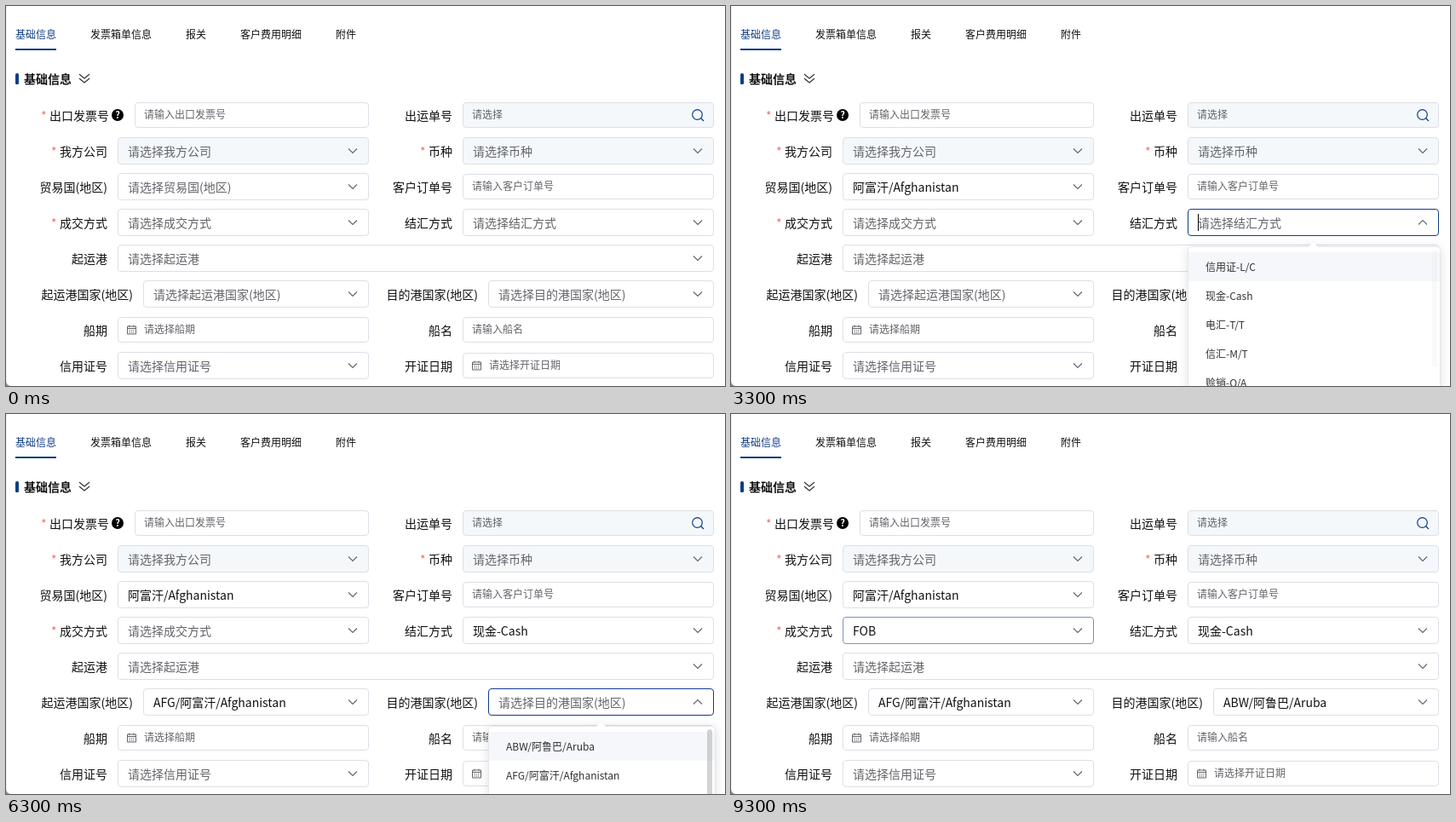
An HTML page that plays this animation: 844 px wide and 446 px high, repeating every 9.4 s.

```html
<!DOCTYPE html>
<html lang="zh">
<head>
<meta charset="utf-8">
<style>
  html, body { margin: 0; width: 100%; height: 100%; overflow: hidden; background: #fff; }
  svg { display: block; font-family: "Noto Sans CJK SC", "Noto Sans CJK", "Noto Sans SC", sans-serif; }
  text { white-space: pre; }
  .pop { filter: drop-shadow(0 2px 6px rgba(0, 0, 0, .12)); }
</style>
</head>
<body>
<svg id="stage" width="844" height="446" viewBox="0 0 844 446"></svg>
<script>
const LOOP = 9400, STEP = 100;
const BLUE = '#0f3c86', LINE = '#dcdfe6', HOVER = '#c0c4cc', INK = '#111', HINT = '#626469';
const stage = document.getElementById('stage');

// ---------- helpers ----------
function el(parent, tag, attrs = {}, content) {
  const node = document.createElementNS('http://www.w3.org/2000/svg', tag);
  set(node, attrs);
  if (content !== undefined) node.textContent = content;
  parent.appendChild(node);
  return node;
}
function set(node, attrs) {
  for (const k in attrs) node.setAttribute(k, attrs[k]);
}
const label = (parent, x, y, s, size, fill = INK, more = {}) =>
  el(parent, 'text', { x, y, 'font-size': size, fill, ...more }, s);
const stroke = (parent, d, color, width = 1.1) =>
  el(parent, 'path', { d, fill: 'none', stroke: color, 'stroke-width': width });
const clamp = v => Math.max(0, Math.min(1, v));

function bezier(x1, y1, x2, y2) {
  const at = (a, b, s) => 3 * (1 - s) ** 2 * s * a + 3 * (1 - s) * s * s * b + s ** 3;
  return x => {
    let lo = 0, hi = 1;
    for (let i = 0; i < 24; i++) {
      const mid = (lo + hi) / 2;
      if (at(x1, x2, mid) < x) lo = mid; else hi = mid;
    }
    return at(y1, y2, lo);
  };
}
const zoomEase = bezier(.23, 1, .32, 1), turnEase = bezier(.25, .1, .25, 1);

function mix(a, b, k) {
  const part = (c, i) => parseInt(c.substr(1 + 2 * i, 2), 16);
  return `rgb(${[0, 1, 2].map(i => Math.round(part(a, i) + (part(b, i) - part(a, i)) * k))})`;
}

// ---------- page header ----------
el(stage, 'rect', { width: 844, height: 446, fill: '#fff' });
el(stage, 'rect', { width: 1, height: 446, fill: '#e9f1f3' });
el(stage, 'path', { d: 'M0 441Q1 445 5 446H0Z', fill: '#8c8f94' });
[[11, '基础信息'], [99, '发票箱单信息'], [211, '报关'], [275, '客户费用明细'], [387, '附件']]
  .forEach(([x, s], i) => label(stage, x, 38, s, 12, i ? INK : BLUE));
el(stage, 'rect', { x: 11, y: 50, width: 48, height: 2, fill: BLUE });
el(stage, 'rect', { x: 11, y: 79, width: 4, height: 13, rx: 1.5, fill: BLUE });
label(stage, 21, 91, '基础信息', 14, INK, { 'font-weight': 700 });
stroke(stage, 'M86 80l6 5l6 -5M86 85l6 5l6 -5', '#333', 1.2);

// ---------- form fields ----------
function calendar(x, y) {
  stroke(stage, `M${x + .5} ${y - 4}h10v9h-10zM${x + .5} ${y - 1.5}h10M${x + 3} ${y - 5.5}v2.5M${x + 8} ${y - 5.5}v2.5`, HINT, 1);
  stroke(stage, `M${x + 2.5} ${y + .8}h6M${x + 2.5} ${y + 3}h6`, HINT, 1).setAttribute('stroke-dasharray', '1.4 .9');
}

function field(kind, x, right, y, name, hint, opts = {}) {
  const tall = kind === 'select', h = tall ? 32 : 30;
  const size = tall ? 14 : 12;
  const end = opts.labelEnd || x - 12;
  label(stage, end, y + 6, name, 14, INK, { 'text-anchor': 'end' });
  if (opts.star) label(stage, opts.star, y + 6, '*', 14, '#f56c6c');
  const box = el(stage, 'rect', {
    x: x + .5, y: y - h / 2 + .5, width: right - x - 1, height: h - 1, rx: 3.5,
    fill: opts.off ? '#f4f8fa' : '#fff', stroke: LINE
  });
  const tx = x + (tall ? 12 : kind === 'date' ? 31 : 11);
  const text = label(stage, tx, y + (tall ? 6 : 4), hint, size, HINT);
  if (kind === 'date') calendar(x + 11, y);
  const f = { x, right, y, hint, box, text, tx };
  if (tall) {
    f.arrow = stroke(stage, 'M-5 -2.5L0 2.5L5 -2.5', HINT);
    f.caret = el(stage, 'rect', { x: tx, y: y - 10, width: 1, height: 20, fill: '#000' });
    turn(f, 0);
    f.caret.setAttribute('opacity', 0);
  }
  return f;
}
const turn = (f, deg) =>
  f.arrow.setAttribute('transform', `translate(${f.right - 19} ${f.y}) rotate(${deg})`);

const L = 131, LE = 426, R = 536, RE = 831;
field('input', 151, LE, 128, '出口发票号', '请输入出口发票号', { labelEnd: 121, star: 41 });
el(stage, 'circle', { cx: 131, cy: 128, r: 7, fill: '#000' });
label(stage, 131, 132, '?', 11, '#fff', { 'text-anchor': 'middle', 'font-weight': 700 });
field('input', R, RE, 128, '出运单号', '请选择', { off: true });
el(stage, 'circle', { cx: 811.5, cy: 127.5, r: 5.8, fill: 'none', stroke: BLUE, 'stroke-width': 1.2 });
stroke(stage, 'M815.5 131.5L819 135', BLUE, 1.2);
field('select', L, LE, 170, '我方公司', '请选择我方公司', { off: true, star: 53 });
field('select', R, RE, 170, '币种', '请选择币种', { off: true, star: 486 });
const trade = field('select', L, LE, 212, '贸易国(地区)', '请选择贸易国(地区)');
const order = field('input', R, RE, 212, '客户订单号', '请输入客户订单号');
const terms = field('select', L, LE, 254, '成交方式', '请选择成交方式', { star: 53 });
const settle = field('select', R, RE, 254, '结汇方式', '请选择结汇方式');
const port = field('select', L, RE, 296, '起运港', '请选择起运港');
const from = field('select', 161, LE, 338, '起运港国家(地区)', '请选择起运港国家(地区)');
const dest = field('select', 566, RE, 338, '目的港国家(地区)', '请选择目的港国家(地区)');
field('date', L, LE, 380, '船期', '请选择船期');
field('input', R, RE, 380, '船名', '请输入船名');
field('select', L, LE, 422, '信用证号', '请选择信用证号');
field('date', R, RE, 422, '开证日期', '请选择开证日期');

// ---------- dropdowns ----------
const lands = ['ABW/阿鲁巴/Aruba', 'AFG/阿富汗/Afghanistan', 'AGO/安哥拉/Angola'];
const menus = [
  { f: trade, pick: 1, hover: 200, open: 690, close: 1462, blur: 2000, thumb: 98,
    items: ['阿鲁巴/Aruba', '阿富汗/Afghanistan', '阿联酋/United Arab Emirates', '孟加拉国/Bangladesh',
      '巴林/Bahrain', '文莱/Brunei', '不丹/Bhutan', '中国/China'] },
  { f: settle, pick: 1, hover: 2600, open: 2990, close: 3690, blur: 4310, thumb: 138,
    items: ['信用证-L/C', '现金-Cash', '电汇-T/T', '信汇-M/T', '赊销-O/A'] },
  { f: from, pick: 1, hover: 4100, open: 4392, close: 5090, blur: 5600, thumb: 90, items: lands },
  { f: dest, pick: 0, hover: 5500, open: 5690, close: 6490, blur: 7290, thumb: 90, items: lands },
  { f: terms, pick: 0, hover: 7300, open: 7490, close: 8290, blur: 9195, thumb: 138,
    items: ['FOB', 'CIF', 'CFR', 'FAS', 'FCA'] }
];
const passing = [[order, 2200, 2600], [port, 7100, 7300]];

for (const m of menus) {
  const { x, right } = m.f, w = right - x + 1, c = (right - x) / 2;
  m.top = m.f.y + 28;
  m.node = el(stage, 'g', { class: 'pop' });
  el(m.node, 'rect', { x: .5, y: .5, width: w, height: 287, rx: 4, fill: '#fff', stroke: '#e4e7ed' });
  el(m.node, 'path', { d: `M${c - 6} 1.2L${c - 1.5} -3.4Q${c} -4.6 ${c + 1.5} -3.4L${c + 6} 1.2Z`, fill: '#fff' });
  m.band = el(m.node, 'rect', { x: 1, width: w - 1, height: 34, fill: '#f5f7fa' });
  m.rows = m.items.map((s, i) => label(m.node, 21, 29 + 34 * i, s, 12, '#303133'));
  m.bar = el(m.node, 'rect', { x: w - 9, y: 4, width: 6, height: m.thumb, rx: 3, fill: '#909399' });
}

// ---------- motion ----------
function drawMenu(m, t) {
  const { f, pick, open, close, blur } = m;
  const chosen = t >= close;
  const shown = t < open ? 0
    : chosen ? 1 - zoomEase(clamp((t - close) / 300))
    : zoomEase(clamp((t - open) / 300));
  const spin = t < open ? 0
    : chosen ? 1 - turnEase(clamp((t - close) / 300))
    : turnEase(clamp((t - open) / 300));

  m.node.style.display = shown > .002 ? '' : 'none';
  set(m.node, { transform: `translate(${f.x} ${m.top}) scale(1 ${shown})`, opacity: shown });
  set(m.band, { y: 7 + 34 * (t > open + 400 ? pick : 0), opacity: chosen ? 0 : 1 });
  set(m.bar, { opacity: .4 * clamp((t - open - 280) / 200) });
  set(m.rows[pick], { fill: chosen ? BLUE : '#303133', 'font-weight': chosen ? 700 : 400 });

  turn(f, 180 * spin);
  f.text.textContent = chosen ? m.items[pick] : f.hint;
  f.text.setAttribute('fill', chosen ? INK : HINT);
  const blink = chosen ? t < close + 300 : t >= open && (t - open) % 1000 < 500;
  f.caret.setAttribute('opacity', blink ? 1 : 0);

  const focused = t >= open - 90;
  f.box.setAttribute('stroke', focused ? mix(BLUE, LINE, clamp((t - blur) / 200))
    : t >= m.hover ? HOVER : LINE);
}

function draw(t) {
  for (const m of menus) drawMenu(m, t);
  for (const [f, a, b] of passing) f.box.setAttribute('stroke', t >= a && t < b ? HOVER : LINE);
}

const start = performance.now();
function tick() {
  const t = (performance.now() - start) % LOOP;
  draw(Math.floor(t / STEP) * STEP);
  requestAnimationFrame(tick);
}
draw(0);
requestAnimationFrame(tick);
</script>
</body>
</html>
```
